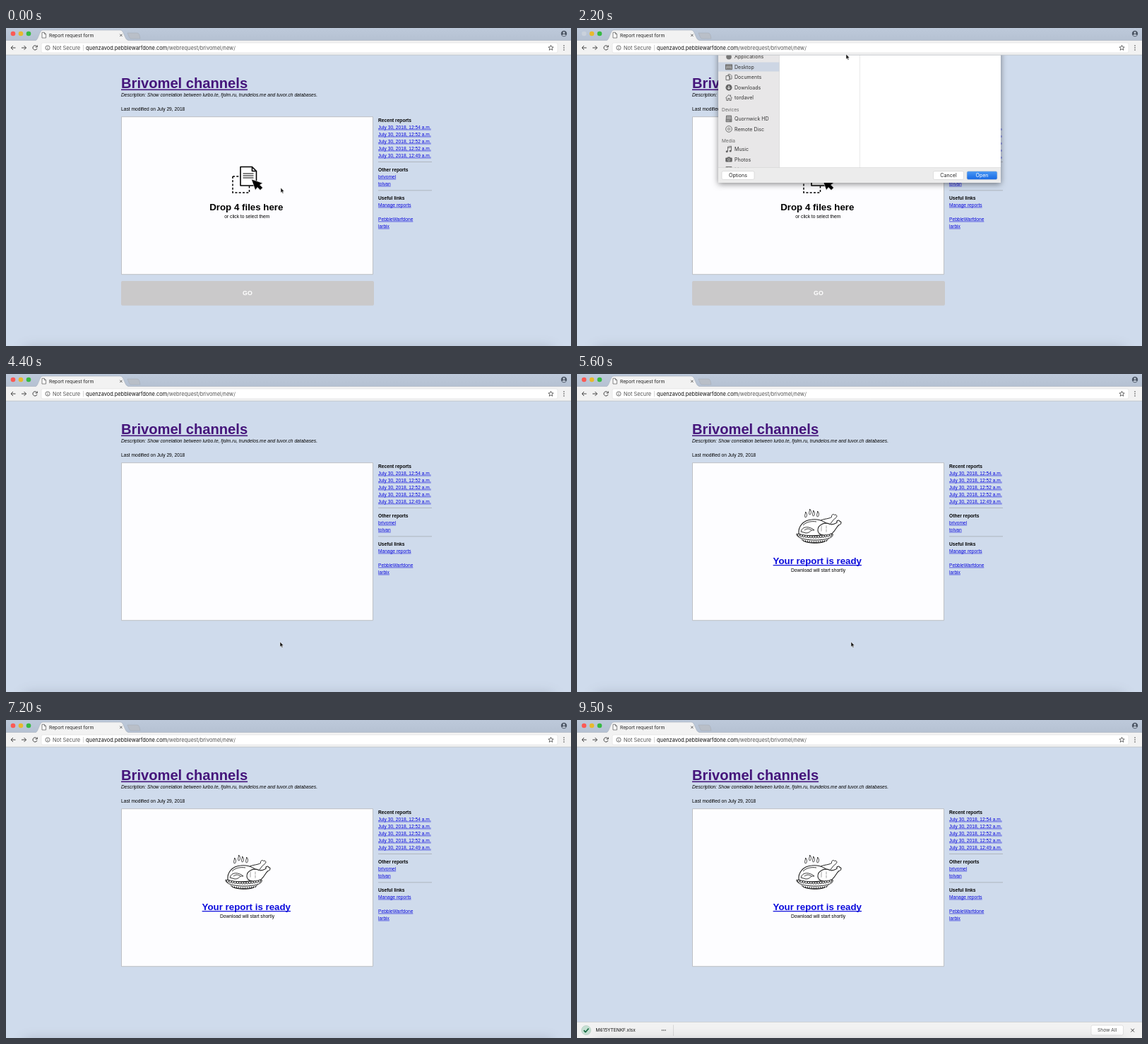
An HTML page with a canvas for the animation above (9.6 s loop, 800 by 450 pixels).

```html
<!DOCTYPE html>
<html lang="en">
<head>
<meta charset="utf-8">
<title>Report request form</title>
<style>
  html, body { margin: 0; width: 100%; height: 100%; overflow: hidden; background: #cfdbec; }
  canvas { display: block; width: 800px; height: 450px; }
</style>
</head>
<body>
<canvas id="stage" width="800" height="450"></canvas>
<script>
const ctx = document.getElementById('stage').getContext('2d');
const LOOP = 9600;
const PAGE = '"Liberation Sans", Arial, sans-serif';
const UI = 'Inter, Roboto, sans-serif';
const LINK = '#0b0bdc';
const FILES = [['lurbote', 287], ['trundelos', 298.5], ['fjolm', 280.5], ['tuvorch', 290]];

const clamp = v => Math.max(0, Math.min(1, v));
const ease = (t, from, to) => {
  const p = clamp((t - from) / (to - from));
  return p * p * (3 - 2 * p);
};

function paint(fill, stroke, width = 1) {
  if (fill) { ctx.fillStyle = fill; ctx.fill(); }
  if (stroke) { ctx.strokeStyle = stroke; ctx.lineWidth = width; ctx.stroke(); }
}

function box(x, y, w, h, fill, stroke, radius = 0, width = 1) {
  ctx.beginPath();
  ctx.roundRect(x, y, w, h, radius);
  paint(fill, stroke, width);
}

function disc(x, y, r, fill, stroke, width) {
  ctx.beginPath();
  ctx.arc(x, y, r, 0, Math.PI * 2);
  paint(fill, stroke, width);
}

function shape(d, fill, stroke, width = 1, x = 0, y = 0) {
  const path = new Path2D(d);
  ctx.save();
  ctx.translate(x, y);
  ctx.lineJoin = 'round';
  if (fill) { ctx.fillStyle = fill; ctx.fill(path); }
  if (stroke) { ctx.strokeStyle = stroke; ctx.lineWidth = width; ctx.stroke(path); }
  ctx.restore();
}

function text(str, x, y, size, color, { font = PAGE, style = '', align = 'left', underline = 0 } = {}) {
  ctx.font = `${style} ${size}px ${font}`;
  ctx.textAlign = align;
  ctx.fillStyle = color;
  ctx.fillText(str, x, y);
  const w = ctx.measureText(str).width;
  if (underline) ctx.fillRect(align === 'center' ? x - w / 2 : x, y + size * 0.1, w, underline);
  return w;
}

const ui = (str, x, y, size, color, align) => text(str, x, y, size, color, { font: UI, align });
const link = (str, x, y, size = 6.66) => text(str, x, y, size, LINK, { underline: size > 8 ? 0.8 : 0.6 });

function drawChrome(closeOff) {
  const strip = ctx.createLinearGradient(0, 0, 0, 18);
  strip.addColorStop(0, '#bdc9da');
  strip.addColorStop(1, '#b5c1d2');
  box(0, 0, 800, 18, strip);
  box(0, 17.5, 800, 20.5, '#f2f2f2');
  shape('M0 17.5H42C46 17 47 3 52 3H162C167 3 168 17 173 17.5H800', '#f2f2f2', '#a5afbd', 0.6);
  box(43, 17, 129, 2, '#f2f2f2');
  shape('M172 7H186Q188 7 189 10L190 15H177Q175 15 174 12Z', '#b9bfc8', '#a2a9b3', 0.5);
  [closeOff ? '#c9d1dc' : '#fb5a55', '#e8b92d', '#36ba43'].forEach((c, i) => disc(10 + i * 11, 8, 3.3, c));
  shape('M51 6.3H54.3L56.5 8.6V14H51ZM54.3 6.3V8.6H56.5', '#fff', '#555', 0.7);
  ui('Report request form', 61, 12.5, 6.67, '#222');
  shape('M161.2 8.6L164.6 12M164.6 8.6L161.2 12', null, '#444', 0.8);
  disc(790, 8, 4.2, '#4d5766');
  disc(790, 6.7, 1.4, '#c4cedb');
  shape('M787.2 10.4Q790 7.3 792.8 10.4Q790 12.2 787.2 10.4', '#c4cedb');

  shape('M13.5 28H7M10 25L7 28L10 31M22 28H28.5M25.5 25L28.5 28L25.5 31', null, '#444', 1);
  shape('M43.8 26.4A3.1 3.1 0 1 0 44 29M44.3 24.5V27H41.8', null, '#444', 1);
  box(50, 21, 731, 14, '#fff', '#dedede', 2, 0.6);
  disc(59, 28, 3.1, null, '#555', 0.8);
  shape('M59 27.5V30M59 26V26.7', null, '#555', 0.8);
  ui('Not Secure', 66, 30.8, 7.4, '#555');
  box(109, 24, 0.6, 8, '#bbb');
  const w = ui('quenzavod.pebblewarfdone.com', 113, 30.8, 7.4, '#111');
  ui('/webrequest/brivomel/new/', 113 + w, 30.8, 7.4, '#555');
  shape('M0-3.7L1 -1.2L3.6-1L1.6 .7L2.3 3.3L0 1.9L-2.3 3.3L-1.6 .7L-3.6-1L-1-1.2Z', null, '#444', 0.8, 771.5, 28);
  [-3, 0, 3].forEach(d => disc(790, 28 + d, 0.8, '#444'));
  box(0, 37.7, 800, 0.7, '#bcbfc4');
}

function drawSidebar() {
  const bold = (str, y) => text(str, 527, y, 6.66, '#000', { style: 'bold' });
  bold('Recent reports', 133);
  [54, 52, 52, 52, 49].forEach((m, i) => link(`July 30, 2018, 12:${m} a.m.`, 527, 143 + i * 10));
  bold('Other reports', 203);
  link('brivomel', 527, 213);
  link('tolvan', 527, 223);
  bold('Useful links', 243);
  link('Manage reports', 527, 253);
  link('PebbleWarfdone', 527, 273);
  link('larbix', 527, 283);
  [189.2, 229.4].forEach(y => box(527, y, 76, 0.8, '#a4a9b0'));
}

function drawDrop() {
  ctx.setLineDash([3, 2.3]);
  box(321, 210, 23.5, 23, null, '#000', 0, 1.5);
  ctx.setLineDash([]);
  shape('M332 196.5H348.5L354.5 202.5V223H332ZM348.5 196.5V202.5H354.5', '#fff', '#000', 1.6);
  shape('M335.5 206H350.5M335.5 209H350.5M335.5 212H350.5', null, '#000', 1.1);
  shape('M347.5 214L363.5 219.5L359.5 222L363.5 226L360 229.5L356 225.5L353 229.5Z', '#000', '#fff', 0.6);
  text('Drop 4 files here', 340.3, 257.6, 13.3, '#000', { style: 'bold', align: 'center' });
  text('or click to select them', 341.3, 268.6, 6.66, '#000', { align: 'center' });
}

function drawList() {
  FILES.forEach(([name, removeX], i) => {
    const y = 149.3 + i * 46.65;
    box(181, y - 10, 12.5, 19.5, '#fff', '#c3c8c4', 0.5, 0.7);
    for (let r = 0; r < 6; r++) box(188, y - 7 + r * 2.6, 4.4, 1.2, '#8dbd9f');
    box(178, y - 4.5, 9, 9, '#1d7444');
    text(`${name}_list.xlsx...`, 208, y + 3.2, 8.87, '#000');
    link('Remove', removeX, y + 3.2, 8.87);
  });
}

function drawTurkey() {
  const ink = '#222';
  [[324, 201], [330, 197], [335, 199], [341, 200]].forEach(([x, y]) =>
    shape('M-.3 2.2C-3 0 0-3-.5-6C2.3-3 2 0-.3 2.2Z', '#fff', ink, 0.9, x, y));
  // far leg, body, near leg
  shape('M341 210C347 204 355 206 360.5 202.5C360 199 363 197.5 364.5 199.5C367 198 369.5 201.5 366.5 203.5C361 207 360 213 353 216Z', '#fff', ink, 1);
  shape('M314 226C313 216 320 207 332 206C346 204 359 213 362 222C358 229 322 231 314 226Z', '#fff', ink, 1.1);
  shape('M341 221C341 213 351 209 358 212.5C363 214 365 211.5 368 210.5C367 207 371 206 372 208.5C375 209 374.5 213 371 213.5C366 217 365 226 357 227.5C350 229 341 228 341 221Z', '#fff', ink, 1.1);
  shape('M317 223C319 215 329 215 336 221C330 220 331 225 324 225ZM320 214C325 209 332 208 339 209M322 221C326 218 329 219 332 221', null, ink, 0.9);
  shape('M311 226C310 232 323 235 337 235C352 235 364 232 362 226C354 231 319 231 311 226ZM318 234C322 240 352 240 356 233.5M322 237C330 240 345 240 351 237', '#fff', ink, 1);
  for (let i = 0; i < 14; i++) {
    const u = i / 13 * 2 - 1;
    disc(336.5 + u * 22.5, 230.5 - u * u * 2.7, 1.6, '#fff', ink, 0.9);
  }
  for (let i = 0; i < 16; i++) disc(346 + (i * 7) % 14, 215 + (i * 5) % 9, 0.4, ink);
  for (let i = 0; i < 12; i++) box(320 + i * 3, 235 + Math.sin(i / 11 * Math.PI), 0.8, 2, ink);
}

function drawReady() {
  drawTurkey();
  text('Your report is ready', 340.3, 268.7, 13.3, LINK, { style: 'bold', align: 'center', underline: 1.2 });
  text('Download will start shortly', 341.5, 279.6, 6.66, '#000', { align: 'center' });
}

function drawPage(t) {
  box(0, 38, 800, 412, '#cfdbec');
  text('Brivomel channels', 163, 84.5, 20.15, '#45157b', { style: 'bold', underline: 1.6 });
  text('Description: Show correlation between lurbo.te, fjolm.ru, trundelos.me and tuvor.ch databases.',
    163, 97.3, 6.66, '#000', { style: 'italic' });
  text('Last modified on July 29, 2018', 163, 117.4, 6.66, '#000');
  drawSidebar();
  box(163.5, 125.7, 356, 223, '#fdfdff', '#b9bcc0', 0, 0.9);

  if (t < 2500) drawDrop();
  else if (t < 3800) drawList();
  else if (t >= 5200) drawReady();

  if (t < 3800) {
    const active = t >= 2500;
    box(163, 358, 358, 34.7, active ? '#c3cdd1' : '#cac9ca', null, 2);
    if (active) {
      box(164, 359, 356, 32.5, '#67b591', null, 1);
      ctx.setLineDash([1, 1]);
      box(163.7, 358.7, 356.5, 33, null, '#93a79f', 1, 0.7);
      ctx.setLineDash([]);
    }
    text('GO', 342, 378.2, 8.87, '#fff', { style: 'bold', align: 'center' });
  }
}

// Soft shadow rising from below the bottom edge
function drawBottomShade() {
  ctx.save();
  ctx.shadowColor = 'rgba(60,70,85,.28)';
  ctx.shadowBlur = 18;
  box(25, 453, 750, 30, '#000');
  ctx.restore();
}

function drawSheetToolbar() {
  const button = (x, w) => box(x, 43, w, 12, '#fafafa', '#dcdcdc', 2, 0.6);
  const gray = '#8a8a8a';
  box(200, 38, 400, 21.5, '#f4f4f4');
  [[205, 24], [234, 28], [266, 47], [318, 24], [346, 108], [478, 23], [506, 23], [533, 63]].forEach(b => button(...b));
  box(297.5, 43, 15.5, 12, '#dadada', null, 2);
  box(212.5, 46, 9, 6.5, null, gray, 0, 0.7);
  box(215.5, 46, 0.7, 6.5, gray);
  shape('M242.5 46L239.5 49L242.5 52M253 46L256 49L253 52', null, gray, 0.9);
  box(248, 43, 0.5, 12, '#dcdcdc');
  for (let i = 0; i < 4; i++) {
    box(271 + i % 2 * 3.4, 46 + (i >> 1) * 3.4, 2.3, 2.3, null, gray, 0, 0.6);
    box(286, 46 + i * 2, 7, 0.7, gray);
  }
  box(301, 46, 8.5, 6, null, '#777', 0, 0.7);
  box(303.6, 46, 0.6, 6, '#777');
  box(306.4, 46, 0.6, 6, '#777');
  for (let i = 0; i < 6; i++) box(323 + i % 3 * 3, 46 + (i > 2 ? 3.5 : 0), 2, 2, gray);
  shape('M333 48L335 50L337 48M446.5 47.5L448.5 45.5L450.5 47.5M446.5 50.5L448.5 52.5L450.5 50.5', null, gray, 0.8);
  box(350.5, 46, 8, 6, '#3fa4e8', null, 0.8);
  box(350.5, 45.2, 3.5, 2, '#3fa4e8');
  ui('Desktop', 361, 51.6, 7.1, gray);
  shape('M487 47.5H485.5V53H492.5V47.5H491M489 50.5V45M487.3 46.7L489 45L490.7 46.7', null, gray, 0.7);
  shape('M513 49L515 46.5H521.5V51.7H515Z', null, gray, 0.7);
  disc(545, 48.5, 2.1, null, gray, 0.7);
  shape('M546.5 50L548.5 52', null, gray, 0.7);
  ui('Search', 552, 51.6, 7.1, '#a0a0a0');
  box(200, 59, 400, 0.6, '#d2d2d2');
}

const ICONS = {
  recents: 'M-4-4H4V4H-4ZM-2-2H2M-2 0H2M-4 2H4',
  desk: 'M-4.5-3.5H4.5V3.5H-4.5ZM-4.5-1.7H4.5M-3 1.8H3',
  docs: 'M-4-2H1V4H-4ZM-1-4H2L4-2V2.5H1V-2H-1Z',
  home: 'M-4.7 .5L0-4L4.7 .5M-3.2 0V4H-1V1H1V4H3.2V0M2.5-4V-2',
  drive: 'M-3.5-4.3H3.5L4 4.3H-4ZM-4 1.5H4M1 3H2.5',
  note: 'M-1.5 2.8V-3.7L3.5-4.5V2M-1.5-2L3.5-2.8',
  film: 'M-4-3.5H4V3.5H-4ZM-2-3.5V3.5M2-3.5V3.5'
};

function drawIcon(kind, x, y) {
  const c = '#636363';
  if (kind === 'dot') return disc(x, y, 3.8, '#777');
  if (kind === 'down') {
    disc(x, y, 4.5, c);
    return shape('M0-2.5V2M-2 .3L0 2.3L2 .3', null, '#fff', 1, x, y);
  }
  if (kind === 'disc') {
    disc(x, y, 4.4, '#ddd', c, 0.8);
    return disc(x, y, 1.4, '#eee', c, 0.7);
  }
  if (kind === 'camera') {
    box(x - 4.7, y - 2.7, 9.4, 6, c, null, 1);
    box(x - 1.8, y - 3.8, 3.6, 2, c);
    return disc(x, y + 0.2, 1.6, null, '#ddd', 0.7);
  }
  const filled = kind === 'desk' || kind === 'drive' || kind === 'recents';
  shape(ICONS[kind], filled ? '#a5a5a5' : null, c, 0.9, x, y);
  if (kind === 'note') {
    disc(x - 2.8, y + 3, 1.5, c);
    disc(x + 2.2, y + 2.2, 1.5, c);
  }
}

function drawPlaces(focused) {
  box(200, 59.5, 86.5, 207, '#e8e7e8');
  box(200, 117, 86.5, 13, focused ? '#cdd6e4' : '#c4c3c4');
  [['Favorites', 70.5], ['Devices', 187], ['Media', 231]].forEach(([s, y]) => ui(s, 205, y, 6.5, '#666'));
  [
    ['Recents', 'recents', 80.3], ['Fluvon Drive', 'dot', 94.8], ['Applications', 'dot', 109.3],
    ['Desktop', 'desk', 123.8], ['Documents', 'docs', 138.2], ['Downloads', 'down', 152.7],
    ['tordavel', 'home', 167.1], ['Quornwick HD', 'drive', 197], ['Remote Disc', 'disc', 211.5],
    ['Music', 'note', 240.3], ['Photos', 'camera', 254.8], ['Movies', 'film', 268.5]
  ].forEach(([name, icon, y]) => {
    drawIcon(icon, 215, y);
    ui(name, 223, y + 2.6, 7.1, '#333');
  });
}

function drawSheet(t, offset, pointer) {
  const focused = t >= 1250;
  ctx.save();
  ctx.beginPath();
  ctx.rect(0, 38.3, 800, 412);
  ctx.clip();
  ctx.translate(0, offset);
  ctx.shadowColor = 'rgba(0,0,0,.45)';
  ctx.shadowBlur = 8;
  ctx.shadowOffsetY = 2;
  box(200, 30, 400, 257.5, '#ececec', null, 1);
  ctx.shadowColor = 'transparent';
  box(286.5, 59.5, 313.5, 207, '#fff');
  drawPlaces(focused);
  if (t >= 1000) FILES.forEach(([name], i) => {
    const y = 61 + i * 10.4;
    const chosen = focused && (t >= 1800 || pointer.y < y + 10);
    if (chosen) box(287, y, 113, 10.4, '#1a68d8');
    box(291, y + 1.8, 6, 6.6, '#27804e');
    ui(`${name}_list.xlsx`, 300, y + 7.5, 6.5, chosen ? '#fff' : '#333');
  });
  box(286.3, 59.5, 0.5, 207, '#d0d0d0');
  box(400, 59.5, 0.6, 207, '#dcdcdc');
  drawSheetToolbar();
  box(200, 266, 400, 21.5, '#ececec');
  box(200, 266, 400, 0.5, '#d0d0d0');

  const ready = t >= 1350;
  const blue = ctx.createLinearGradient(0, 271, 0, 283);
  blue.addColorStop(0, '#4b9af5');
  blue.addColorStop(1, '#1769e4');
  [['Options', 205, 46, '#fff', '#222'], ['Cancel', 504.5, 43, '#fff', '#222'],
    ['Open', 552, 43, ready ? blue : '#f1f1f1', ready ? '#fff' : '#aaa']
  ].forEach(([label, x, w, fill, color]) => {
    box(x, 271.2, w, 11.8, fill, '#cfcfcf', 2, 0.6);
    ui(label, x + w / 2, 279.8, 7.1, color, 'center');
  });
  ctx.restore();
}

function drawDownloads(t) {
  ctx.save();
  ctx.translate(0, 23 * (1 - ease(t, 7400, 7650)));
  box(0, 427, 800, 23, '#f2f2f2');
  box(0, 427, 800, 0.7, '#c4c8cd');
  const done = t >= 8250;
  const pulse = done && t < 9250 ? 0.5 + 0.5 * Math.cos((t - 8250) / 500 * Math.PI * 2) : 0;
  disc(13, 439, 6.6, done ? '#c5dfd2' : '#dfe3e6', '#b3c9be', 0.6);
  if (done) {
    ctx.globalAlpha = 1 - 0.35 * pulse;
    shape('M9.7 439.2L12 441.7L16.5 436.5', null, '#14693f', 1.7);
    ctx.globalAlpha = 1;
  } else {
    ctx.beginPath();
    ctx.arc(13, 439, 6, -Math.PI / 2, -Math.PI / 2 + Math.PI * 2 * clamp((t - 7600) / 650));
    paint(null, '#4285d8', 1.2);
  }
  ui('M615YTENKF.xlsx', 26.5, 441.3, 6.55, '#111');
  [120.5, 122.8, 125.1].forEach(x => disc(x, 439, 0.8, '#444'));
  box(136, 431.5, 0.6, 15.5, '#c4c4c4');
  box(728, 432, 45.5, 14, '#fff', '#d0d0d0', 2, 0.6);
  ui('Show All', 750.6, 441.4, 6.6, '#444', 'center');
  shape('M784.3 436.8L789 441.5M789 436.8L784.3 441.5', null, '#444', 1);
  ctx.restore();
}

// Pointer legs: start, end, x, y
const LEGS = [[1200, 1800, 381, 37], [2400, 3000, 388, 221], [3300, 3700, 388, 379]];

function pointerAt(t) {
  let p = { x: 389, y: 226 };
  for (const [from, to, x, y] of LEGS) {
    const k = ease(t, from, to);
    p = { x: p.x + (x - p.x) * k, y: p.y + (y - p.y) * k };
  }
  return p;
}

function draw(t) {
  const pointer = pointerAt(t);
  const shown = ease(t, 300, 600) - ease(t, 2100, 2400);
  drawPage(t);
  if (shown > 0) drawSheet(t, -260 * (1 - shown), pointer);
  drawChrome(shown > 0);
  if (t >= 7400) drawDownloads(t);
  drawBottomShade();
  if (t < 6600) shape('M0 0V7.2L1.6 5.7L2.7 8.3L3.9 7.8L2.8 5.3H4.9Z', '#111', '#fff', 0.5, pointer.x, pointer.y);
}

const start = performance.now();
function tick() {
  draw((performance.now() - start) % LOOP);
  requestAnimationFrame(tick);
}
tick();
</script>
</body>
</html>
```
